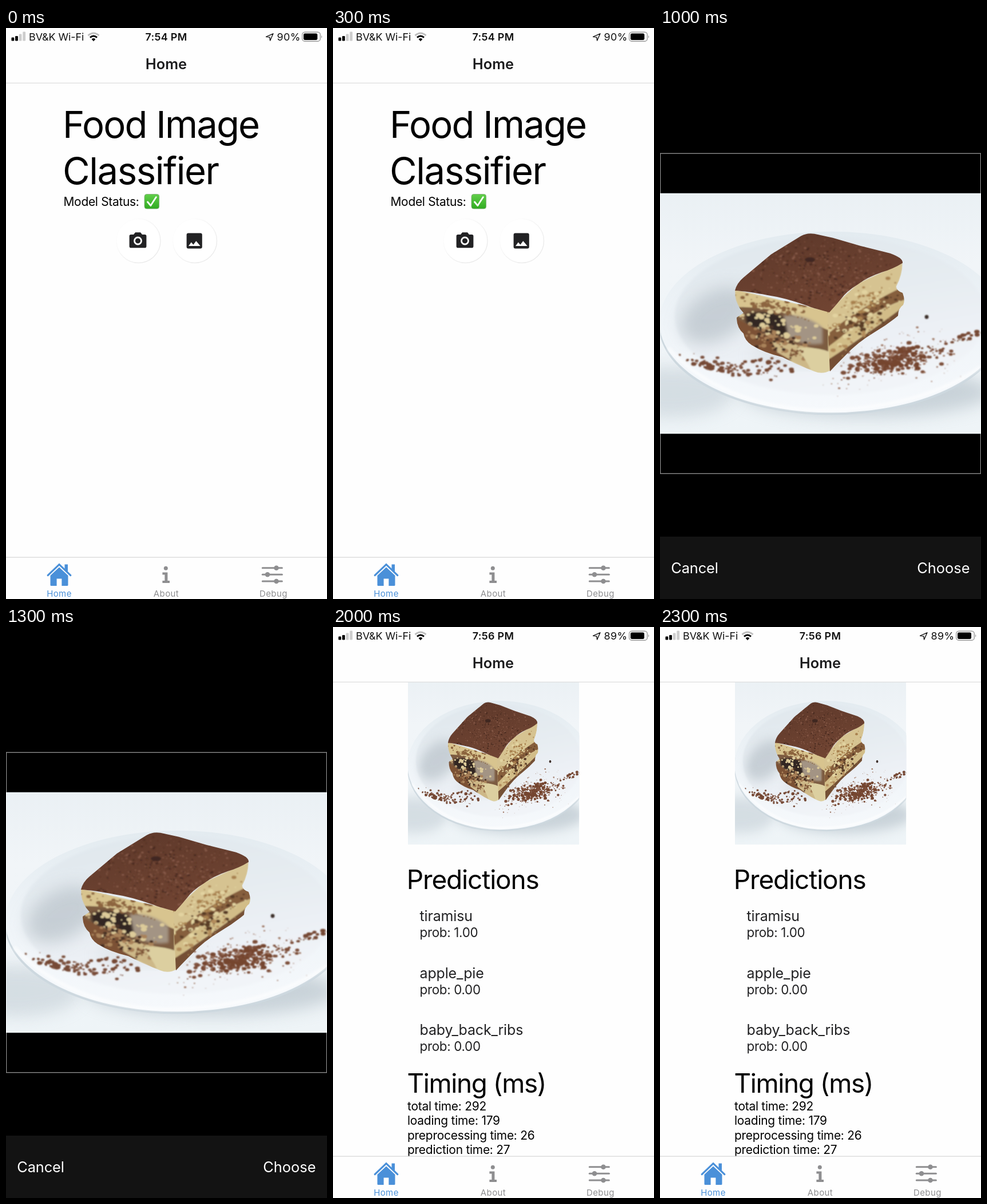
Write an HTML page that moves like this. It is 561x998 px and loops after 2.5 s.

```html
<!DOCTYPE html>
<html lang="en">
<head>
<meta charset="utf-8">
<title>Food Image Classifier</title>
<style>
  html, body { margin: 0; width: 100%; height: 100%; overflow: hidden; background: #fefefe; }
  svg { display: block; width: 561px; height: 998px; }
  text { font-family: Inter, "Liberation Sans", sans-serif; font-optical-sizing: none; white-space: pre; }
</style>
</head>
<body>
<svg id="stage" viewBox="0 0 561 998" xmlns="http://www.w3.org/2000/svg"></svg>
<script>
const STEP = 500, BLUE = '#4a90d9', GREY = '#8e8e90', INK = '#222224';
const CLASSES = `apple_pie baby_back_ribs baklava beef_carpaccio beef_tartare beet_salad beignets
  bibimbap bread_pudding breakfast_burrito bruschetta caesar_salad cannoli caprese_salad carrot_cake
  ceviche cheese_plate cheesecake chicken_curry chicken_quesadilla chicken_wings chocolate_cake
  chocolate_mousse churros clam_chowder club_sandwich crab_cakes creme_brulee croque_madame
  cup_cakes`.split(/\s+/);

let seed = 11;
const rnd = () => (seed = (seed * 16807) % 2147483647) / 2147483647;
const around = () => rnd() + rnd() - 1;

const text = (s, x, y, size, o = {}) =>
  `<text x="${x}" y="${y}" font-size="${size}" fill="${o.fill || '#000'}" font-weight="${o.weight || 400}"
    text-anchor="${o.anchor || 'start'}" letter-spacing="${(o.gap || 0) * size}">${s}</text>`;
const rect = (x, y, w, h, fill, more = '') =>
  `<rect x="${x}" y="${y}" width="${w}" height="${h}" fill="${fill}" ${more}/>`;
const path = (d, fill, more = '') => `<path d="${d}" fill="${fill}" ${more}/>`;
const line = (d, color, w, more = '') => path(d, 'none', `stroke="${color}" stroke-width="${w}" ${more}`);
const disc = (x, y, r, fill) => `<circle cx="${x}" cy="${y}" r="${r}" fill="${fill}"/>`;
const oval = (x, y, rx, ry, fill, more = '') =>
  `<ellipse cx="${x}" cy="${y}" rx="${rx}" ry="${ry}" fill="${fill}" ${more}/>`;
const photo = (x, y, w, h) => `<use href="#photo" x="${x}" y="${y}" width="${w}" height="${h}"/>`;

// Scatter n small grains; place() gives the spot, size is the largest radius.
function grains(n, size, fill, place) {
  let out = '';
  for (let i = 0; i < n; i++) {
    const [x, y] = place(), r = size * (0.25 + 0.75 * rnd() ** 2);
    out += oval(x.toFixed(1), y.toFixed(1), (r * 1.4).toFixed(1), r.toFixed(1), fill);
  }
  return out;
}

const TOP = 'M131 459Q134 446 146 436L194 396L246 364Q256 358 270 360L302 367L350 381L402 394Q425 402 424 411' +
  'Q408 421 388 427Q362 436 346 448Q326 460 316 474Q306 486 296 497Q284 494 264 488Q222 472 188 467Q152 460 131 459Z';
const LEFT = 'M131 457L296 495L298 598Q284 606 270 600Q242 590 214 575Q182 568 160 554Q148 546 146 534Q134 524 134 506L146 498Q133 484 131 468Z';
const RIGHT = 'M292 496L346 446L424 410Q424 432 413 452Q414 460 424 463Q429 476 425 484Q416 490 416 503Q398 518 376 531Q344 550 322 574Q308 588 297 600Z';

function photoSymbol() {
  const spot = (x, y, w, h, tilt = 0) => () => {
    const dx = around() * w;
    return [x + dx, y + dx * tilt + around() * h];
  };
  return `
  <linearGradient id="wall" x1="0" y1="0" x2="0" y2="1">
    <stop offset="0" stop-color="#eaf0f4"/><stop offset=".3" stop-color="#f1f5f8"/><stop offset="1" stop-color="#eef4f7"/>
  </linearGradient>
  <linearGradient id="dish" x1="0" y1="0" x2=".35" y2="1">
    <stop offset="0" stop-color="#dfe7ed"/><stop offset=".5" stop-color="#e6ecf1"/><stop offset="1" stop-color="#f1f4f8"/>
  </linearGradient>
  <linearGradient id="rim" x1="0" y1="0" x2="0" y2="1">
    <stop offset="0" stop-color="#e3ebf0"/><stop offset=".5" stop-color="#eff4f8"/><stop offset="1" stop-color="#f6f9fc"/>
  </linearGradient>
  <linearGradient id="cocoa" x1="0" y1="0" x2=".4" y2="1">
    <stop offset="0" stop-color="#5d382a"/><stop offset="1" stop-color="#704432"/>
  </linearGradient>
  <filter id="soft" x="-50%" y="-50%" width="200%" height="200%"><feGaussianBlur stdDeviation="14"/></filter>
  <filter id="blur"><feGaussianBlur stdDeviation="2"/></filter>
  <filter id="fine"><feGaussianBlur stdDeviation=".8"/></filter>
  <clipPath id="left"><path d="${LEFT}"/></clipPath>
  <clipPath id="right"><path d="${RIGHT}"/></clipPath>
  <clipPath id="top"><path d="${TOP}"/></clipPath>
  <symbol id="photo" viewBox="0 289 561 420" preserveAspectRatio="none">
    ${rect(0, 289, 561, 420, 'url(#wall)')}
    ${oval(20, 636, 110, 44, '#c4cfd6', 'filter="url(#soft)" opacity=".6"')}
    ${oval(360, 636, 220, 44, '#b5c1c9', 'filter="url(#soft)" opacity=".65"')}
    ${oval(300, 519, 302, 157, '#cdd8df')}
    ${oval(300, 514, 301, 158, 'url(#rim)')}
    ${oval(298, 503, 272, 138, 'url(#dish)', 'filter="url(#blur)"')}
    ${line('M14 560Q110 660 270 668Q450 668 561 592', '#fff', 6, 'opacity=".6" filter="url(#blur)"')}
    ${oval(98, 502, 66, 42, '#bcc5cc', 'filter="url(#soft)" opacity=".75" transform="rotate(-30 98 502)"')}
    ${oval(250, 572, 95, 14, '#bfc4c8', 'filter="url(#soft)" opacity=".4"')}
    <g filter="url(#fine)">
      ${grains(75, 3.2, '#7d523f', spot(125, 593, 92, 14, .17))}
      ${grains(45, 3.6, '#764935', spot(82, 590, 46, 6, .3))}
      ${grains(30, 3.8, '#764935', spot(195, 592, 76, 25))}
      ${grains(190, 3.8, '#7d4f3b', spot(412, 580, 98, 30, -.16))}
      ${grains(150, 4, '#74452f', spot(410, 582, 88, 21, -.16))}
      ${grains(130, 1.7, '#9b725d', spot(410, 580, 130, 54, -.15))}
      ${grains(26, 3.4, '#764935', spot(535, 540, 32, 7, -.3))}
      ${disc(466, 505, 3.4, '#3e302b')}
    </g>
    <g clip-path="url(#left)"><g filter="url(#fine)">
      ${path(LEFT, '#d8c48f')}
      ${path('M134 488Q184 486 234 503L294 528V566Q246 562 206 552L132 530Z', '#7c5b41')}
      ${path('M150 500Q206 490 224 514Q236 532 214 538Q176 534 150 514Z', '#302724', 'filter="url(#blur)"')}
      ${path('M216 502Q256 500 284 524V552Q250 556 224 540Z', '#a39484', 'filter="url(#blur)"')}
      ${path('M130 506L186 536L252 560L262 584L214 580L140 552Z', '#7b5134')}
      ${path('M196 548Q240 552 296 566L300 608L256 596L204 566Z', '#cdb888')}
      ${grains(75, 3.6, '#8d653f', spot(200, 487, 70, 18, .23))}
      ${grains(60, 3.8, '#ddcb9a', spot(205, 515, 74, 36, .25))}
      ${grains(60, 3.8, '#a9825a', spot(200, 545, 66, 24, .3))}
      ${grains(45, 3.2, '#4a3325', spot(205, 548, 64, 30, .3))}
      ${path('M240 560Q270 556 297 566V606L266 602Q256 580 240 560Z', '#dccfa0')}
      ${grains(14, 4, '#80583a', spot(240, 566, 18, 8))}
    </g></g>
    <g clip-path="url(#right)"><g filter="url(#fine)">
      ${path(RIGHT, '#d6c391')}
      ${path('M290 538Q340 492 430 450V474Q360 496 292 562Z', '#865e3c')}
      ${path('M290 560Q360 506 430 474V492Q360 524 294 582Z', '#d2bd88')}
      ${path('M290 582Q350 544 430 484V520L296 614Z', '#745035')}
      ${grains(75, 3.6, '#a9824f', spot(355, 482, 70, 36, -.58))}
      ${grains(75, 3.8, '#e2d3a0', spot(350, 500, 70, 42, -.58))}
      ${grains(45, 3.4, '#5a3d28', spot(355, 512, 68, 32, -.58))}
      ${grains(30, 3.4, '#b28c5c', spot(350, 535, 60, 22, -.6))}
    </g></g>
    ${path(TOP, 'url(#cocoa)')}
    <g clip-path="url(#top)"><g filter="url(#fine)">
      ${grains(380, 1.8, '#875a48', spot(275, 430, 150, 70))}
      ${grains(300, 1.8, '#4b2c21', spot(275, 425, 150, 70))}
      ${oval(262, 405, 9, 4, '#3f2720')}
    </g></g>
  </symbol>`;
}

function statusBar(time, charge, moving) {
  const bars = [6, 8.5, 12, 16].map((h, i) =>
    rect(9.5 + i * 6.6, 22.5 - h, 4.8, h, i < 2 ? '#000' : '#cdcdcd', 'rx="1.2"')).join('');
  return bars +
    text('BV&amp;K Wi-Fi', 40, 22, 17.95, { gap: -.004, fill: '#111' }) +
    line('M143.5 13.2Q153 4.8 162.5 13.2', '#bdbdbd', 3) +
    line('M147 16.6Q153 11.4 159 16.6', '#000', 3) +
    path('M149.6 19.4Q153 16.6 156.4 19.4L153 23.2Z', '#000') +
    text(time, 280, 22, 17.95, { weight: 600, anchor: 'middle', gap: .015, fill: '#111' }) +
    path('M467 9.8L454.6 15.4L460.8 16.2L461.6 22Z', moving ? '#000' : 'none',
      'stroke="#111" stroke-width="1.4" stroke-linejoin="round"') +
    text(charge + '%', 473.5, 22, 17.95, { gap: .025, fill: '#111' }) +
    rect(517.7, 7.2, 31.6, 16, 'none', 'rx="4.6" stroke="#9a9a9a" stroke-width="1.4"') +
    rect(520, 9.5, 27 * charge / 100, 11.4, '#000', 'rx="2.6"') +
    path('M551 12.4Q553.6 15.2 551 18Z', '#9a9a9a');
}

function tabBar(active) {
  const tint = name => name === active ? BLUE : GREY;
  const label = (name, x) => text(name, x, 994.4, 15, { anchor: 'middle', gap: .027, fill: tint(name) });
  const h = tint('Home'), a = tint('About'), d = tint('Debug');
  return rect(0, 925, 561, 73, '#fefefe') + rect(0, 924.5, 561, 1.3, '#d9d9da') +
    line('M73.2 956.6L93 937.6L112.8 956.6', h, 3.2, 'stroke-linecap="round"') +
    path('M102.5 937.5H108V952L102.5 947Z', h) +
    path('M77.5 957L93 942.4L108.5 957V973.5Q108.5 975 107 975H97.4V962.5H88.6V975H79Q77.5 975 77.5 973.5Z', h) +
    disc(279.3, 944.2, 3.5, a) + path('M273.4 951.5H282.4V966H286V970H273.4V966H277.4V955.5H273.4Z', a) +
    [[943.8, 472.5], [955.3, 457], [967, 472.5]].map(([y, x]) =>
      line(`M448.3 ${y}H482.4`, d, 3, 'stroke-linecap="round"') + disc(x, y, 4.3, d)).join('') +
    label('Home', 93) + label('About', 280) + label('Debug', 467.4);
}

const header = title => rect(0, 0, 561, 96, '#fefefe') + rect(0, 95.6, 561, 1.3, '#dededf') +
  text(title, 280, 72.2, 25.4, { weight: 600, anchor: 'middle', fill: '#1c1c1e' });

const ring = x => `<circle cx="${x}" cy="372" r="38.5" fill="#fff" stroke="url(#edge)" stroke-width="1.4"/>`;

function intro() {
  return text('Food Image', 99, 192, 65.2, { gap: -.028 }) +
    text('Classifier', 99, 273.4, 65.2, { gap: -.022 }) +
    text('Model Status:', 100.5, 310.5, 20.94, { gap: -.014 }) +
    rect(242, 290.5, 25.6, 25.4, 'url(#green)', 'rx="4" stroke="#7fa878" stroke-width=".8"') +
    line('M247.5 304L252.8 310.4L262.4 295.6', '#fff', 2.8, 'stroke-linecap="round" stroke-linejoin="round"') +
    ring(231.5) + ring(330) +
    path('M218.4 361H223L226 357.2H235L238 361H242.6Q245.4 361 245.4 363.8V381.4Q245.4 384.2 242.6 384.2H218.4Q215.6 384.2 215.6 381.4V363.8Q215.6 361 218.4 361Z', INK) +
    `<circle cx="230.5" cy="372" r="6" fill="${INK}" stroke="#fff" stroke-width="2.8"/>` +
    rect(315.6, 358.4, 27.2, 27, INK, 'rx="3.2"') +
    path('M319 381L323.8 374.6L327.4 378.8L332.3 372.3L339.6 381Z', '#fff');
}

function results() {
  const rows = [['tiramisu', '1.00'], ['apple_pie', '0.00'], ['baby_back_ribs', '0.00']];
  const times = ['total time: 292', 'loading time: 179', 'preprocessing time: 26', 'prediction time: 27'];
  return photo(131, 429.3, 299.2, 299.2) +
    text('Predictions', 128.8, 806, 46, { gap: -.025 }) +
    rows.map(([name, prob], i) =>
      text(name, 151.5, 862 + i * 99.6, 25, { gap: -.006, fill: INK }) +
      text('prob: ' + prob, 151.5, 890 + i * 99.6, 22.4, { gap: -.014, fill: INK })).join('') +
    text('Timing (ms)', 129.6, 1161.5, 45.8, { gap: -.03 }) +
    times.map((s, i) => text(s, 130, 1193 + i * 25.45, 20.94, { gap: -.012 })).join('');
}

const home = (scroll, full, ...status) => rect(0, 0, 561, 998, '#fefefe') +
  `<g transform="translate(0 ${-scroll})">${intro()}${full ? results() : ''}</g>` +
  header('Home') + statusBar(...status) + tabBar('Home');

const debug = () => rect(0, 0, 561, 998, '#fefefe') +
  text('Classes', 13.5, 153, 56.5, { gap: -.028 }) +
  CLASSES.map((s, i) => text(s, 14.2, 187 + i * 25.45, 20.94, { gap: -.005 })).join('') +
  header('Debug') + tabBar('Debug');

const picker = () => rect(0, 0, 561, 998, '#000') + photo(0, 288.6, 561, 420.8) +
  rect(.5, 219.3, 560, 559.4, 'none', 'stroke="#fff" stroke-opacity=".54" stroke-width="1.4"') +
  rect(0, 889, 561, 109, '#131313') +
  text('Cancel', 19.3, 953, 25.4, { fill: '#fff', gap: -.005 }) +
  text('Choose', 541.5, 953, 25.4, { fill: '#fff', anchor: 'end' });

const scenes = [
  home(0, false, '7:54 PM', 90, false),
  debug(),
  picker(),
  home(47, true, '7:10 PM', 96, true),
  home(348, true, '7:56 PM', 89, false)
];

const stage = document.getElementById('stage');
stage.innerHTML = `<defs>
  <linearGradient id="green" x1="0" y1="0" x2="0" y2="1">
    <stop offset="0" stop-color="#62cf4b"/><stop offset="1" stop-color="#30ab20"/>
  </linearGradient>
  <linearGradient id="edge" x1="0" y1="0" x2="1" y2="1">
    <stop offset=".2" stop-color="#fdfdfd"/><stop offset=".8" stop-color="#ebebeb"/>
  </linearGradient>
  ${photoSymbol()}</defs>` + scenes.map(s => `<g class="scene">${s}</g>`).join('');

// Each scene is on for one step of the loop, with hard cuts.
const duration = STEP * scenes.length;
stage.querySelectorAll('.scene').forEach((el, i) => el.animate([
  { opacity: 1, easing: 'step-end' },
  { opacity: 0, offset: STEP / duration, easing: 'step-end' },
  { opacity: 0 }
], { duration, iterations: Infinity, delay: i * STEP - duration }));
</script>
</body>
</html>
```
